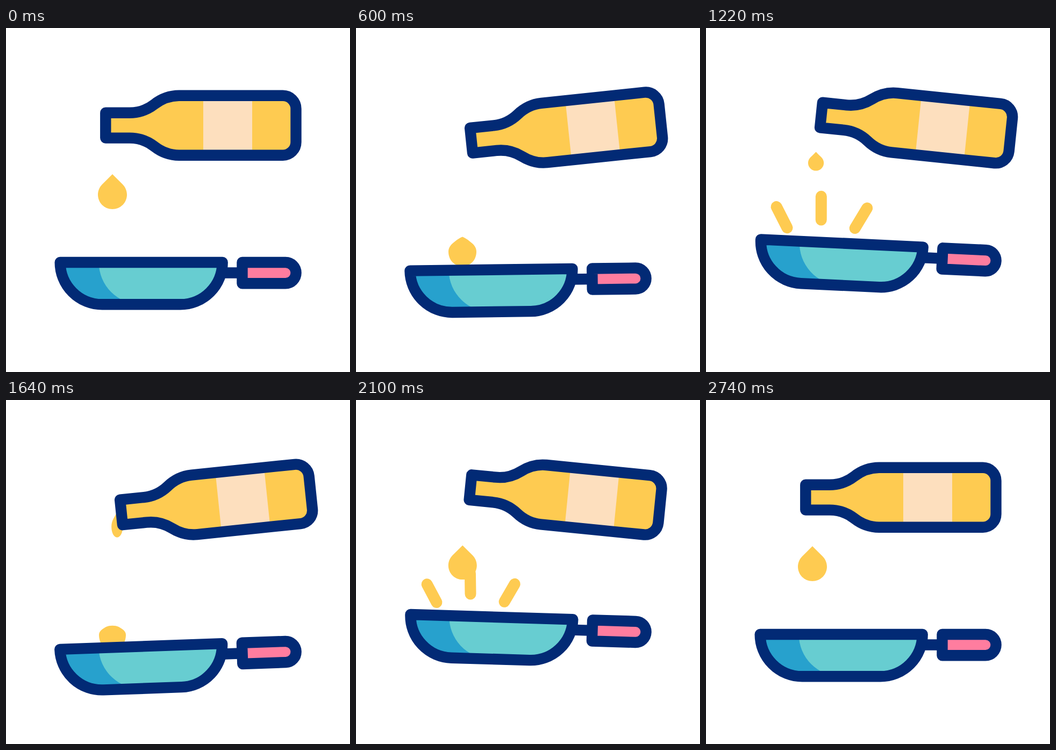
Recreate the animation shown at these times as an HTML page. Size 640 by 640 pixels, loop 3.08 s.

```html
<!DOCTYPE html>
<html lang="en">
<head>
<meta charset="utf-8">
<title>Oil and pan</title>
<style>
  html, body { margin: 0; width: 100%; height: 100%; overflow: hidden; background: #fff; }
  svg { display: block; width: 100%; height: 100%; }
  .line { fill: none; stroke: #022a75; stroke-width: 20.4; stroke-linejoin: round; }
  .oil { fill: #fecb51; }
  .spark { stroke: #fecb51; stroke-linecap: round; }
</style>
</head>
<body>
<svg viewBox="0 0 640 640">
  <path id="falling" class="oil"/>
  <path id="hanging" class="oil"/>
  <g id="sparks"></g>
  <g id="bottle">
    <path id="glass" class="oil" d="M185.3 157.8H230C248 157.8 263 152 276 142S304 125.8 322 125.8H515a24.5 24.5 0 0 1 24.5 24.5V212.2a24.5 24.5 0 0 1-24.5 24.5H322C304 236.7 289 230.5 276 220.4S248 204.6 230 204.6H185.3Z"/>
    <path fill="#fddfbe" d="M367 126h91v110h-91z"/>
    <path id="rim" class="line"/>
  </g>
  <g id="pan">
    <path fill="#67cdd1" d="M100.7 436H402.7A78.3 78.3 0 0 1 324.4 514.3H179A78.3 78.3 0 0 1 100.7 436Z"/>
    <path fill="#27a1cd" d="M100.7 436H172.7A78.3 78.3 0 0 0 251 514.3H179A78.3 78.3 0 0 1 100.7 436Z"/>
    <path class="line" d="M400 455.5H440"/>
    <path class="line" d="M100.7 436H402.7A78.3 78.3 0 0 1 324.4 514.3H179A78.3 78.3 0 0 1 100.7 436Z"/>
    <path class="line" style="fill:#ff7d9f" d="M439.5 436H520a19.6 19.6 0 0 1 0 39.2H439.5Z"/>
  </g>
</svg>
<script>
const LOOP = 3080, START = 220, END = 2740;
const SWING = 1020;  // bottle period
const TOSS = 960;    // pan period
const POUR = 1120;   // second drop leaves the bottle
const LAST = 1600;   // third drop leaves the bottle

const $ = id => document.getElementById(id);
const clamp = v => Math.max(0, Math.min(1, v));
const ramp = (t, from, to) => clamp((t - from) / (to - from));
const ease = (t, from, to) => {
  const u = ramp(t, from, to);
  return u * u * (3 - 2 * u);
};
// Falls from 1 to 0 with a long soft tail.
const settle = (t, from) => (1 - ramp(t, from, END) ** 1.7) ** 6.5;

$('rim').setAttribute('d', $('glass').getAttribute('d'));

function bottlePose(t) {
  const home = settle(t, 2060);
  const p = (Math.min(t, 2120) - 600) % SWING;
  const swing = -6 + 12 * (ease(p, 0, 440) - ease(p, 600, SWING));
  const out = ease(t, START, 600) * home;
  const tilt = swing * out;
  const drop = (2 + 0.065 * tilt * tilt) * out;
  return `translate(${28 * out} ${drop}) rotate(${tilt} 412.5 181)`;
}

// The pan bobs on a cosine; its tilt follows a little later.
function panPose(t) {
  const amount = ease(t, 440, 600) * settle(t, 2100);
  const wave = peak => Math.cos(2 * Math.PI * (Math.min(t, 2120) - peak) / TOSS);
  const lift = (17.6 * wave(670) - 5.7) * amount;
  const tilt = -2.95 * wave(803) * amount;
  return `translate(0 ${lift}) rotate(${tilt} 550 455)`;
}

// melt = 0 is a pointed drop, melt = 1 a flat blob.
function dropPath(x, y, sx, sy, melt) {
  const mix = (a, b) => a + (b - a) * melt;
  const wide = mix(27, 25);
  const half = [
    [0, mix(-38, -17)],
    [mix(6.3, 10), mix(-31.7, -17)], [mix(12.7, 13), mix(-25.3, -14)], [19.1, mix(-19.1, -10)],
    [mix(24, 23), mix(-14.2, -7)], [wide, mix(-7, -4)], [wide, 0],
    [wide, 15], [mix(15, 17), 27], [0, 27]
  ];
  const mirror = half.slice(0, -1).reverse().map(([a, b]) => [-a, b]);
  const pts = [...half, ...mirror].map(([a, b]) => `${x + a * sx} ${y + b * sy}`);
  return `M${pts[0]}C${pts.slice(1).join(' ')}Z`;
}

// age since leaving the bottle, left = share of growth still to come
function newDrop(age, left, y, melt) {
  const sx = 1 - 0.7 * left;
  const sy = sx + 0.52 * (1 - ease(age, 0, 100));
  return dropPath(198 + 10 * left, y, sx, sy, melt);
}

function fallingDrop(t) {
  if (t < 700) {
    const k = Math.max(0, t - START) / 380;
    return dropPath(198, 310 + 106 * k * k, 1, 1, ramp(t, 560, 640));
  }
  const age = t - POUR;
  if (age < 0 || age > 580) return '';
  return newDrop(age, 1 - ramp(age, 0, 290), 215 + 0.344 * age + 0.000159 * age * age, ramp(t, 1560, 1640));
}

function hangingDrop(t) {
  const age = t - LAST;
  if (age < 0) return '';
  const left = (1 - ramp(age, 0, 600)) ** 2;
  return newDrop(age, left, 310 - 85 * left, 0);
}

// Each spark: base point and direction in degrees from straight up.
const sparks = [[148.5, 412, -29.7], [211, 394.5, -2.6], [274.5, 407, 28.4]].map(([x, y, angle]) => {
  const el = document.createElementNS('http://www.w3.org/2000/svg', 'line');
  el.setAttribute('class', 'spark');
  el.setAttribute('transform', `translate(${x} ${y}) rotate(${angle})`);
  $('sparks').append(el);
  return el;
});

function drawSparks(t) {
  const s = t > 1700 ? t - TOSS : t;
  const head = 44 - 68 * (1 - ramp(s, 900, 1240)) ** 2;
  const tail = Math.min(head - 7, 0) + 44 * ease(s, 1230, 1380);
  const width = 21 * ramp(s, 900, 930) * (1 - ramp(s, 1320, 1380));
  for (const el of sparks) {
    el.setAttribute('y1', -tail);
    el.setAttribute('y2', -head);
    el.setAttribute('stroke-width', width);
  }
}

function draw(t) {
  const pan = panPose(t);
  $('bottle').setAttribute('transform', bottlePose(t));
  $('pan').setAttribute('transform', pan);
  $('sparks').setAttribute('transform', pan);
  $('falling').setAttribute('d', fallingDrop(t));
  $('hanging').setAttribute('d', hangingDrop(t));
  drawSparks(t);
}

let start;
function tick(now) {
  start ??= now;
  draw((now - start) % LOOP);
  requestAnimationFrame(tick);
}
draw(0);
requestAnimationFrame(tick);
</script>
</body>
</html>
```
